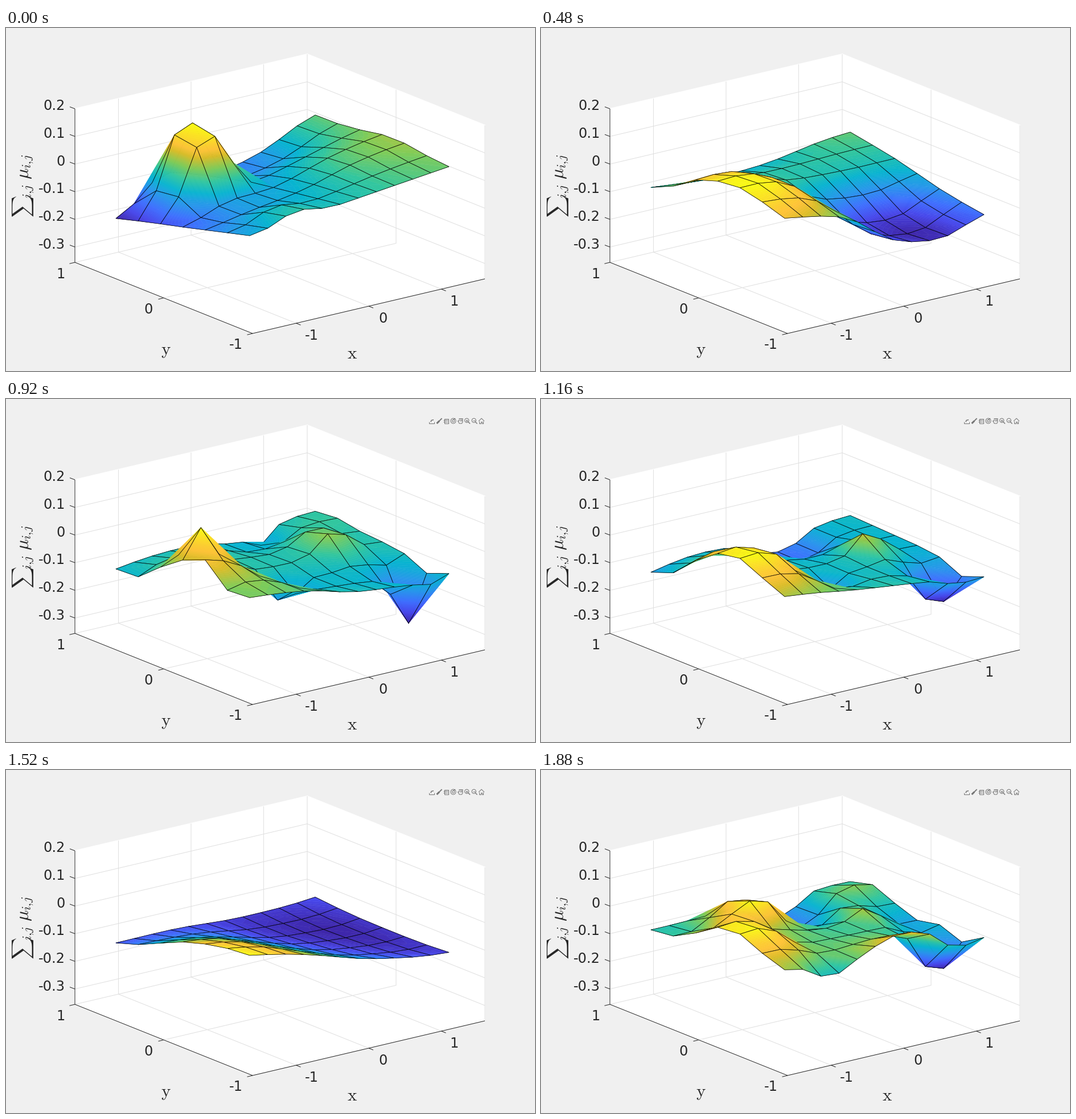
Animation, 929 px wide and 603 px high, one loop 1.92 s. Source, as a matplotlib script:

```python
import numpy as np
import matplotlib.pyplot as plt
from matplotlib.animation import FuncAnimation
from matplotlib.collections import PolyCollection
from matplotlib.colors import LinearSegmentedColormap

W, H, DPI = 929, 603, 64
PX = 72 / DPI  # points per pixel
FRAME_MS, FRAMES = 40, 48
INK, GRID = "#262626", "#dfdfdf"

PARULA = LinearSegmentedColormap.from_list("parula", [
    (0, (.242, .150, .660)), (.111, (.280, .278, .922)), (.222, (.244, .436, .999)),
    (.333, (.154, .590, .922)), (.444, (.030, .708, .816)), (.556, (.194, .776, .625)),
    (.667, (.504, .799, .348)), (.778, (.863, .741, .160)), (.84, (.997, .766, .220)),
    (.889, (.989, .814, .189)), (1, (.977, .984, .081))])

# Mesh nodes in screen space: i runs to the back right, j to the front right.
I, J = np.meshgrid(np.arange(12), np.arange(7))
SX = 193 + 31.82 * I + 39.15 * J
PLANE = 248 - 7.48 * I + 15.69 * J


def relief(left, back, near, right, *bumps):
    """Height in pixels: a sheet through four corners plus bumps (i, j, lift, ri, rj)."""
    u, v = I / 11, J / 6
    height = (1 - v) * (left + (back - left) * u) + v * (near + (right - near) * u)
    for i, j, lift, ri, rj in bumps:
        height = height + lift * np.exp(-np.abs((I - i) / ri) ** 3 - np.abs((J - j) / rj) ** 3)
    return height


tall_peak = relief(-87, 13, -23, 16,
                   (2.6, 1.35, 132, 1.5, 1.2), (7.2, .4, -17, 2.3, 1.4),
                   (2.6, 5.5, 15, 1.3, 1.1), (9.5, 3.5, 13, 3, 1.5))

two_pits = relief(-38, -21, -18, -41,
                  (2, 1.5, 29, 1.7, 1.6), (1.5, 4.5, 10, 2, 2), (5, 1, -13, 1.1, 1.8),
                  (6, 4.5, -27, 3.2, 2), (10.5, 2, 10, 2.5, 1.5),
                  (4.3, 4, -57, 1.1, .7), (9.6, 5, -70, 1.3, .75))

swell = relief(-29, -17, 3, -61,
               (1.2, 3.3, 43, 2.6, 2.1), (7.4, 4.9, -56, 2.9, 2.1), (4.5, 0, -17, 4, .9))

spikes = relief(-44, -26, -8, -37,
                (1, 3, 122, .85, .85), (0, 4, 42, .7, .7), (0, 5, -20, .7, .7),
                (0, 1, -18, .7, .7), (8, 0, -42, .8, .8), (8.4, 2.4, 42, 1.3, 1.1),
                (10, 1, 16, 1.6, .8), (7, 5, -36, 2.8, 1.7),
                (4.2, 4, -57, .95, .7), (10, 5, -137, .8, .8))

hills = relief(-58, -39, -8, -50,
               (.9, 3.4, 62, 2.1, 1.8), (2.5, 1, 17, 2, 1.2), (7, .6, -31, 1.6, 1.2),
               (8.2, 3, 40, 1, .9), (4.5, 4.2, -28, 1.2, .8), (9.7, 5, -60, 1.25, .8))

calm = relief(-56, -53, 13, -54,
              (.5, 3.7, 15, 2.5, 2), (8, 3.3, -20, 3.5, 3.5))

ridges = relief(-33, -32, -10, -29,
                (.8, 3.5, 45, 1.8, 1.6), (3.3, 1.7, 52, 1.4, 1.1), (6.8, .7, -36, 1.5, 1.6),
                (8, 2.6, 22, .9, 1.1), (10, 1, 18, 1.3, .8), (10.5, 3, -22, 1.3, 1),
                (2.5, 6, -24, 1.3, .8), (6.7, 6, 27, 1.9, .9), (9.7, 5, -70, 1.35, .85))

KEYS = np.array([tall_peak, two_pits, swell, spikes, hills, calm, ridges])
KEY_STEPS = [0, 2, 4, 6, 10, 13, 16]
STEP_STARTS = [0, 2, 5, 8, 12, 14, 17, 20, 23, 26, 29, 32, 34, 38, 41, 44, 47]
TOOLBAR_START = 22

fig = plt.figure(figsize=(W / DPI, H / DPI), dpi=DPI, facecolor="#f0f0f0")
ax = fig.add_axes([0, 0, 1, 1])
ax.set_xlim(0, W)
ax.set_ylim(H, 0)
ax.axis("off")


def line(points, color=INK, width=1.0, z=1):
    xs, ys = zip(*points)
    return ax.plot(xs, ys, color=color, lw=width * PX, zorder=z,
                   solid_capstyle="butt")[0]


def project(x, y, z):
    return (121 + 127.5 * (x + 1.6) + 156 * (1 - y),
            142 - 30 * (x + 1.6) + 62.5 * (1 - y) + 486 * (.2 - z))


def label(x, y, text, size=24, **kw):
    kw = {"ha": "center", "va": "baseline", "family": "DejaVu Sans", **kw}
    return ax.text(x, y, text, fontsize=size * PX, color=INK, **kw)


def draw_axes():
    low, top = -.3556, .2
    corners = [(-1.6, 1, top), (1.6, 1, top), (1.6, -1, top),
               (1.6, -1, low), (-1.6, -1, low), (-1.6, 1, low)]
    ax.fill(*zip(*[project(*c) for c in corners]), fc="white", ec="white", lw=2 * PX, zorder=0)

    def grid(*points):
        line([project(*p) for p in points], GRID)

    def tick(x, y, z, dx, dy):
        px, py = project(x, y, z)
        line([(px, py), (px + dx, py + dy)], z=2)

    for k in (-1, 0, 1):
        grid((k, 1, top), (k, 1, low), (k, -1, low))
        grid((1.6, k, top), (1.6, k, low), (-1.6, k, low))
        tick(k, -1, low, 8, 3.2)
        tick(-1.6, k, low, -9.5, 2.3)
        label(662 + 125 * k, 517.5 - 30 * k, str(k))
        label(250 - 154 * k, 501.5 - 62 * k, str(k))
    for k in range(6):
        z = (2 - k) / 10
        if k:
            grid((-1.6, 1, z), (1.6, 1, z), (1.6, -1, z))
        tick(-1.6, 1, z, -9, -3.4)
        label(104, 144.5 + 48.6 * k, f"{z:g}", ha="right")
    line([project(*c) for c in [corners[0], corners[5], corners[4], corners[3]]], z=2)

    label(281, 574, r"$\mathrm{y}$", 31, math_fontfamily="cm")
    label(608, 581, r"$\mathrm{x}$", 31, math_fontfamily="cm")
    for text, size, x, y in ((r"$\sum$", 26.5, 39, 333), (r"$i{,}j$", 22.4, 45, 299),
                             (r"$\mu_{i{,}j}$", 32, 39, 266)):
        label(x, y, text, size, ha="left", rotation=90, rotation_mode="anchor",
              math_fontfamily="cm")


BREAKS = np.linspace(0, 1, 97)


def color_bands(xy, level):
    """Cut a triangle along its level lines; yields (polygon, level)."""
    order = np.argsort(level)
    (low, mid, high), (a, b, c) = xy[order], level[order]
    c = max(c, a + 1e-9)
    cuts = np.r_[a, BREAKS[(BREAKS > a) & (BREAKS < c)], c]
    direct = np.c_[np.interp(cuts, [a, c], [low[0], high[0]]),
                   np.interp(cuts, [a, c], [low[1], high[1]])]
    bent = np.c_[np.interp(cuts, [a, b, c], [low[0], mid[0], high[0]]),
                 np.interp(cuts, [a, b, c], [low[1], mid[1], high[1]])]
    for k in range(len(cuts) - 1):
        bend = [mid] if cuts[k] <= b <= cuts[k + 1] else []
        yield (np.array([direct[k], bent[k], *bend, bent[k + 1], direct[k + 1]]),
               (cuts[k] + cuts[k + 1]) / 2)


def make_mesh(height):
    level = (height - height.min()) / np.ptp(height)
    node = np.stack([SX, PLANE - height], axis=-1)
    polys, faces, edges, widths = [], [], [], []
    # Cells from back to front, so nearer ones cover farther ones.
    for i in range(10, -1, -1):
        for j in range(6):
            a, b, c, d = (j, i), (j, i + 1), (j + 1, i + 1), (j + 1, i)
            for tri in ((a, b, c), (a, d, c)):
                xy = np.array([node[p] for p in tri])
                for poly, t in color_bands(xy, np.array([level[p] for p in tri])):
                    polys.append(poly)
                    faces.append(PARULA(t))
                    edges.append(PARULA(t))
                    widths.append(.5 * PX)
            polys.append(np.array([node[p] for p in (a, b, c, d)]))
            faces.append((0, 0, 0, 0))
            edges.append((0, 0, 0, 1))
            widths.append(.75 * PX)
    mesh = PolyCollection(polys, facecolors=faces, edgecolors=edges, linewidths=widths,
                          joinstyle="round", zorder=3, visible=False)
    ax.add_collection(mesh, autolim=False)
    return mesh


def make_toolbar():
    gray, parts = "#757575", []

    def stroke(cx, *points, width=1.0):
        parts.append(line([(cx + x, 38.5 + y) for x, y in points], gray, width, 4))

    def ring(cx, r, shift=0.0):
        parts.append(ax.add_patch(plt.Circle((cx + shift, 38.5 + shift), r, fill=False,
                                             ec=gray, lw=PX, zorder=4)))

    # export, brush
    stroke(748, (-4.5, 1), (-4.5, 4), (4.5, 4), (4.5, 1))
    stroke(748, (-2, 2), (-1, -1), (3, -2), width=1.5)
    stroke(761, (4.5, -4.5), (-1, 1), width=1.8)
    stroke(761, (0, 0), (-4.5, 4.5), width=3)
    # data tip, rotate
    stroke(773, (-3, -4), (4.5, -4), (4.5, 4), (-3, 4), (-3, -4))
    for y in (-1.5, 1.5):
        stroke(773, (-5, y), (3, y))
    ring(785.5, 4.5)
    ring(785.5, 2)
    stroke(785.5, (0, -2), (3.5, -4.5), width=1.3)
    # hand
    stroke(798, (-2, 4.5), (-4.5, 0), (-2, 0), (-2, -4), (4, -4), (4, 2), (2.5, 4.5), (-2, 4.5))
    for x in (0, 2):
        stroke(798, (x, -4), (x, 0))
    # zoom in, zoom out
    for cx in (810, 822.5):
        ring(cx, 3.6, -.8)
        stroke(cx, (1.8, 1.8), (5, 5), width=1.4)
        stroke(cx, (-2.8, -.8), (1.2, -.8))
    stroke(810, (-.8, -2.8), (-.8, 1.2))
    # home
    stroke(835, (-5, .5), (0, -4.5), (5, .5))
    stroke(835, (-3.5, 0), (-3.5, 4.5), (-1, 4.5), (-1, 1), (1, 1), (1, 4.5),
           (3.5, 4.5), (3.5, 0))
    return parts


def surface_at(step):
    pos = np.interp(step, KEY_STEPS, np.arange(len(KEYS)))
    k = min(int(pos), len(KEYS) - 2)
    return KEYS[k] + (pos - k) * (KEYS[k + 1] - KEYS[k])


draw_axes()
meshes = [make_mesh(surface_at(s)) for s in range(len(STEP_STARTS))]
toolbar = make_toolbar()


def update(frame):
    step = np.searchsorted(STEP_STARTS, frame, side="right") - 1
    for k, mesh in enumerate(meshes):
        mesh.set_visible(k == step)
    for part in toolbar:
        part.set_visible(frame >= TOOLBAR_START)
    return meshes + toolbar


anim = FuncAnimation(fig, update, frames=FRAMES, interval=FRAME_MS, repeat=True,
                     repeat_delay=0, blit=False)
plt.show()
```
